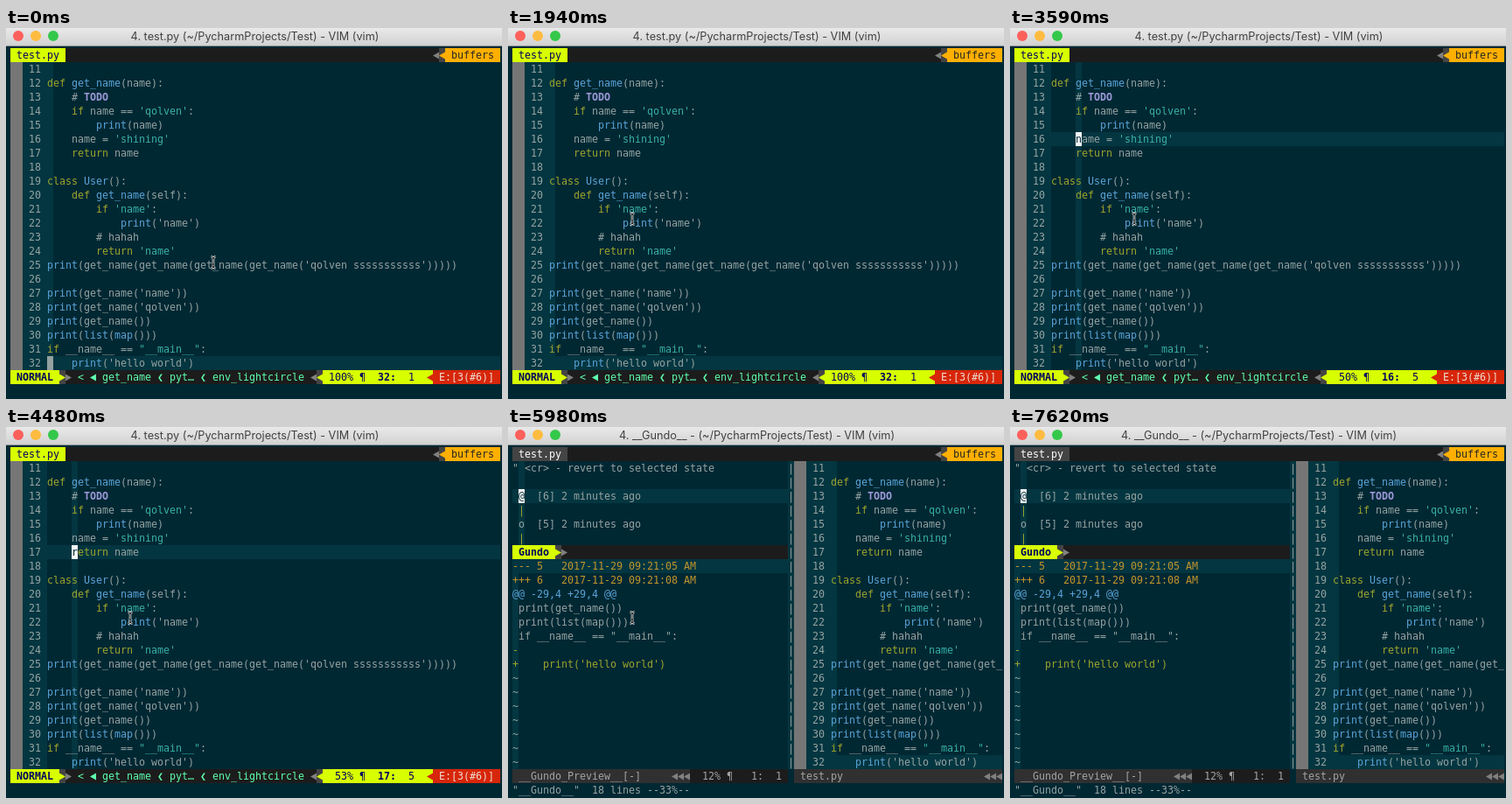
An HTML page with a canvas for the animation above (7.77 s loop, 567 px wide and 424 px high).

```html
<!DOCTYPE html>
<html lang="en">
<head>
<meta charset="utf-8">
<title>Undo tree in a terminal editor</title>
<style>
  html, body { margin: 0; width: 100%; height: 100%; overflow: hidden; background: #002833; }
  canvas { display: block; }
</style>
</head>
<body>
<canvas id="stage" width="567" height="424"></canvas>
<script>
const ctx = document.getElementById('stage').getContext('2d');
const LOOP = 7770;
const CW = 7, RH = 16, LEFT = 5, RIGHT = 565, TOP = 39;
const TAB = 23, STATUS = 391, CMD = 407;
const MONO = '11.63px "DejaVu Sans Mono", "Liberation Mono", monospace';
const C = {
  bg: '#002833', band: '#033640', text: '#95a3a3', key: '#9ca62c', func: '#5ba4d9',
  str: '#38b0a6', todo: '#9d98d8', gold: '#c2952c', sign: '#767676',
  lime: '#d7ff00', navy: '#00005f', mint: '#5fffaf', bar: '#1c1c1c', mid: '#444444',
  arrow: '#808080', amber: '#ffaf00', red: '#d7260a', dim: '#303030', faint: '#a4a4a4'
};

const code = `
def get_name(name):
    # TODO
    if name == 'qolven':
        print(name)
    name = 'shining'
    return name

class User():
    def get_name(self):
        if 'name':
            print('name')
        # hahah
        return 'name'
print(get_name(get_name(get_name(get_name('qolven sssssssssss')))))

print(get_name('name'))
print(get_name('qolven'))
print(get_name())
print(list(map()))
if __name__ == "__main__":
    print('hello world')`.split('\n');

// Mouse pointer: [start, x, y] of its top left corner
const pointer = [
  [0, 233, 260], [450, 177, 241], [590, 138, 210], [6880, 146, 210],
  [7030, 272, 258], [7180, 338, 287], [7480, 507, 410], [7620, -50, -50]
];

const rowY = line => TOP + (line - 11) * RH;
const within = (t, a, b) => t >= a && t < b;

function box(x, y, w, h, color) {
  ctx.fillStyle = color;
  ctx.fillRect(x, y, w, h);
}

function put(str, x, y, color, bold) {
  ctx.font = (bold ? 'bold ' : '') + MONO;
  ctx.fillStyle = color;
  ctx.fillText(str, x, y + 12);
}

function arrow(x, y, dir, color, back) {
  if (back) box(x, y, CW, RH, back);
  const tip = dir > 0 ? x + 7 : x, base = dir > 0 ? x : x + 7;
  ctx.fillStyle = color;
  ctx.beginPath();
  ctx.moveTo(base, y + 4.5);
  ctx.lineTo(tip, y + 8.5);
  ctx.lineTo(base, y + 12.5);
  ctx.fill();
}

function tokens(line) {
  const re = /(#.*)|('[^']*'|"[^"]*")|\b(def|class|if|return)\b|\b(print|list|map)\b|([^\s\w]+|\w+|\s+)/g;
  const out = [];
  let last = '';
  for (const m of line.matchAll(re)) {
    let color = C.text;
    if (m[2]) color = C.str;
    else if (m[3]) color = C.key;
    else if (m[4] || (/^\w/.test(m[0]) && /def|class/.test(last))) color = C.func;
    out.push([m[0], m.index, color]);
    if (m[0].trim()) last = m[0];
  }
  return out;
}
const parsed = code.map(tokens);

function codeView(x, line, col) {
  const tx = x + 6 * CW;
  box(x, TOP, 2 * CW, STATUS - TOP, C.sign);
  box(x + 2 * CW, TOP, 4 * CW, STATUS - TOP, C.band);
  box(tx + (col - 1) * CW, TOP, CW, STATUS - TOP, C.band);
  box(tx, rowY(line), RIGHT - tx, RH, C.band);
  ctx.save();
  ctx.beginPath();
  ctx.rect(x, TOP, RIGHT - x, STATUS - TOP);
  ctx.clip();
  parsed.forEach((row, i) => {
    const y = TOP + i * RH;
    put(String(11 + i), x + 3 * CW, y, C.text);
    for (const [str, at, color] of row) {
      if (str === '# TODO') {
        put('#', tx + at * CW, y, C.text);
        put('TODO', tx + (at + 2) * CW, y, C.todo, true);
      } else put(str, tx + at * CW, y, color);
    }
  });
  ctx.restore();
}

function block(x, y, ch, color = '#f4f8f8') {
  box(x, y, CW, RH, color);
  put(ch, x, y, C.bg);
}

function titleBar(title) {
  const g = ctx.createLinearGradient(0, 0, 0, 20);
  g.addColorStop(0, '#e9e9e9');
  g.addColorStop(1, '#d2d2d2');
  box(0, 0, 567, 20, g);
  box(0, 20, 567, 1, '#8f9799');
  ['#fc605b', '#fdbc40', '#34c84a'].forEach((color, i) => {
    ctx.fillStyle = color;
    ctx.beginPath();
    ctx.arc(14 + 20 * i, 9, 6, 0, 7);
    ctx.fill();
  });
  ctx.font = '12.7px Inter, "Open Sans", sans-serif';
  ctx.textAlign = 'center';
  ctx.fillStyle = '#414141';
  ctx.fillText(title, 284.5, 14);
  ctx.textAlign = 'left';
}

function tabBar(active) {
  box(LEFT, TAB, RIGHT - LEFT, RH, C.bar);
  box(LEFT, TAB, 63, RH, active ? C.lime : C.mid);
  put('test.py', 12, TAB, active ? C.navy : '#ffffff');
  arrow(488, TAB, -1, C.arrow);
  arrow(495, TAB, -1, C.amber, C.mid);
  box(502, TAB, 63, RH, C.amber);
  put('buffers', 509, TAB, '#262626');
}

function modeLabel(str, y) {
  const end = LEFT + (str.length + 2) * CW;
  box(LEFT, y, end - LEFT, RH, C.lime);
  put(str, 12, y, C.navy, true);
  arrow(end, y, 1, C.lime, C.mid);
  arrow(end + CW, y, 1, C.arrow);
}

function statusBar(percent, line, col) {
  const y = STATUS;
  box(LEFT, y, RIGHT - LEFT, RH, C.bar);
  modeLabel('NORMAL', y);
  put('<', 82, y, C.mint);
  arrow(96, y, -1, C.mint);
  put('get_name', 110, y, C.mint);
  put('❮', 173, y, C.mint);
  put('pyt…', 187, y, C.mint);
  put('❮', 222, y, C.mint);
  put('env_lightcircle', 236, y, C.mint);
  arrow(348, y, -1, C.arrow);
  arrow(355, y, -1, C.lime, C.mid);
  box(362, y, 119, RH, C.lime);
  put(String(percent).padStart(3) + '% ¶', 369, y, C.navy);
  put(line + ':', 425, y, C.navy, true);
  put(String(col), 460, y, C.navy);
  arrow(481, y, -1, C.red, C.lime);
  box(488, y, 77, RH, C.red);
  put('E:[3(#6)]', 495, y, '#eeddd0');
}

function editor(t) {
  const line = t < 2090 ? 32 : t < 4480 ? 16 : 17;
  const col = t < 2090 ? 1 : 5;
  titleBar('4. test.py (~/PycharmProjects/Test) - VIM (vim)');
  tabBar(true);
  codeView(LEFT, line, col);
  if (t < 1940) block(47, rowY(32), ' ', '#93a1a1');
  else if (within(t, 2090, 5680)) block(75, rowY(line), line === 16 ? 'n' : 'r');
  statusBar({ 32: 100, 16: 50, 17: 53 }[line], line, col);
  if (within(t, 1490, 1940) || within(t, 5230, 5680)) put(';', 488, CMD, C.text);
  if (t >= 5680) put(':GundoToggle', LEFT, CMD, C.text);
}

function undoTree() {
  titleBar('4. __Gundo__ - (~/PycharmProjects/Test) - VIM (vim)');
  tabBar(false);
  codeView(327, 32, 1);

  // Tree pane
  box(12, TOP, CW, 96, C.band);
  box(LEFT, 71, 315, RH, C.band);
  put('" <cr> - revert to selected state', LEFT, TOP, C.text);
  block(12, 71, '@');
  put('[6] 2 minutes ago', 33, 71, C.text);
  put('|', 12, 87, C.key);
  put('o', 12, 103, C.text);
  put('[5] 2 minutes ago', 33, 103, C.text);
  put('|', 12, 119, C.key);
  box(LEFT, 135, 315, RH, C.bar);
  modeLabel('Gundo', 135);

  // Preview pane
  box(LEFT, 151, 315, RH, C.band);
  box(LEFT, 151, CW, STATUS - 151, C.band);
  [
    ['--- 5   2017-11-29 09:21:05 AM', C.gold],
    ['+++ 6   2017-11-29 09:21:08 AM', C.gold],
    ['@@ -29,4 +29,4 @@', C.func],
    [' print(get_name())', C.text],
    [' print(list(map()))', C.text],
    [' if __name__ == "__main__":', C.text],
    ['-', C.key],
    ["+    print('hello world')", C.key]
  ].forEach(([str, color], i) => put(str, LEFT, 151 + i * RH, color));
  for (let y = 279; y < STATUS; y += RH) put('~', LEFT, y, C.text);

  box(320, TOP, CW, STATUS - TOP, C.band);
  for (let y = TOP; y < STATUS; y += RH) put('|', 320, y, C.text);

  // Inactive status lines
  box(LEFT, STATUS, RIGHT - LEFT, RH, C.dim);
  box(208, STATUS, 112, RH, C.bar);
  put('__Gundo_Preview__[-]', 12, STATUS, C.faint);
  put('12% ¶', 222, STATUS, C.faint);
  put('1:', 278, STATUS, C.faint);
  put('1', 306, STATUS, C.faint);
  put('test.py', 334, STATUS, C.faint);
  box(320, STATUS, CW, RH, C.bg);
  for (const x of [187, 544])
    for (let i = 0; i < 3; i++) arrow(x + i * CW, STATUS, -1, C.arrow);
  put('"__Gundo__"  18 lines --33%--', LEFT, CMD, C.text);
}

function iBeam(x, y) {
  const p = new Path2D();
  p.moveTo(x + 1.5, y + 1.5);
  p.quadraticCurveTo(x + 4, y + 1.5, x + 4, y + 4);
  p.quadraticCurveTo(x + 4, y + 1.5, x + 6.5, y + 1.5);
  p.moveTo(x + 4, y + 4);
  p.lineTo(x + 4, y + 12);
  p.quadraticCurveTo(x + 4, y + 14.5, x + 1.5, y + 14.5);
  p.moveTo(x + 4, y + 12);
  p.quadraticCurveTo(x + 4, y + 14.5, x + 6.5, y + 14.5);
  p.moveTo(x + 2.5, y + 10);
  p.lineTo(x + 5.5, y + 10);
  ctx.strokeStyle = '#e8eded';
  ctx.lineWidth = 2.6;
  ctx.stroke(p);
  ctx.strokeStyle = '#101010';
  ctx.lineWidth = 1;
  ctx.stroke(p);
}

function draw(t) {
  box(0, 0, 567, 424, C.bg);
  if (t < 5980) editor(t);
  else undoTree();
  const [, x, y] = pointer.filter(p => p[0] <= t).pop();
  iBeam(x, y);
}

let start;
function tick(now) {
  start ??= now;
  draw((now - start) % LOOP);
  requestAnimationFrame(tick);
}
draw(0);
requestAnimationFrame(tick);
</script>
</body>
</html>
```
